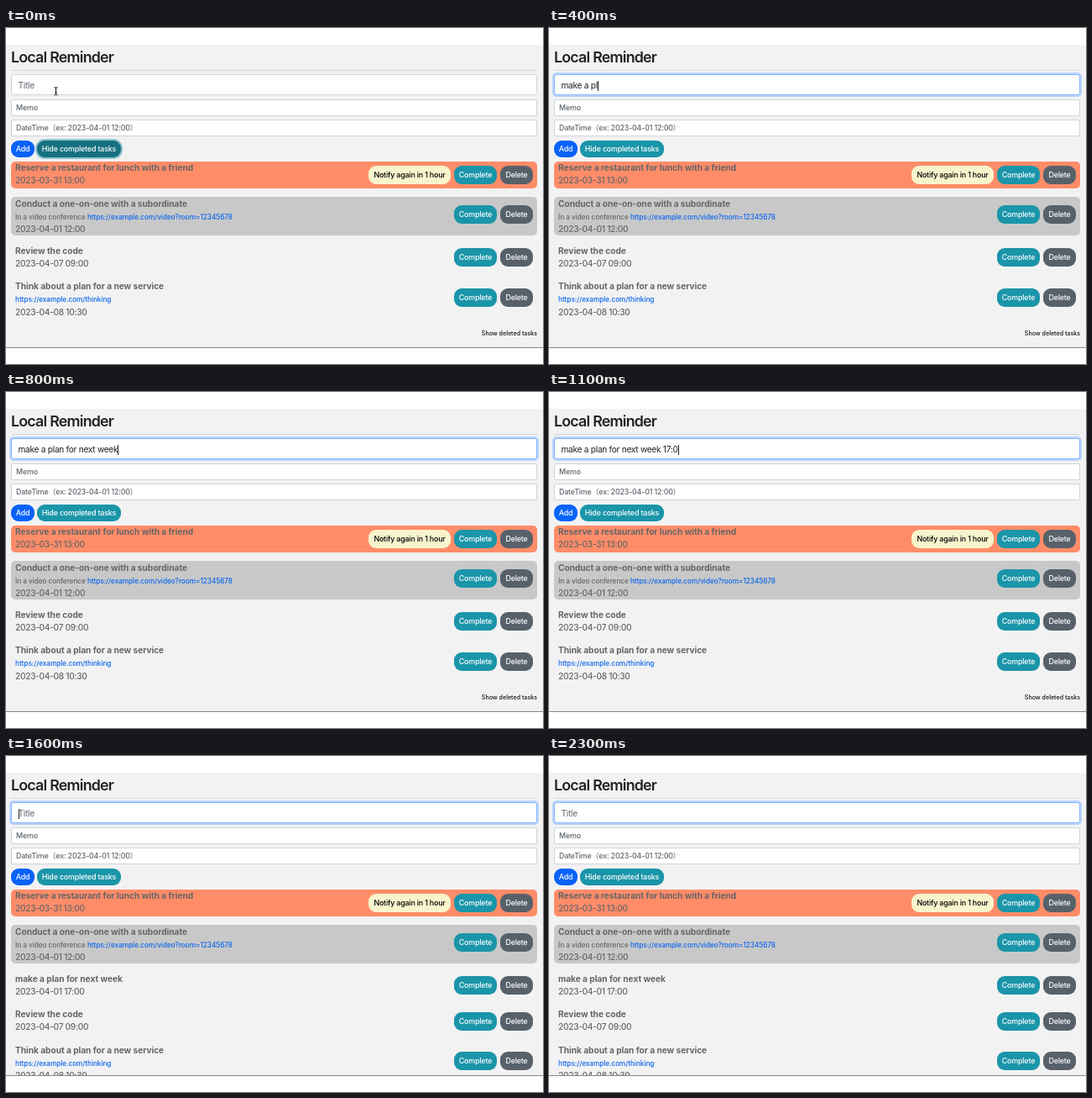
These frames come from a looping animation (640 by 400 pixels, 2.4 s). An HTML page:

```html
<!DOCTYPE html>
<html lang="en">
<head>
<meta charset="utf-8">
<title>Local Reminder</title>
<style>
  html, body { margin: 0; width: 100%; height: 100%; overflow: hidden; background: #fff; }
  #stage {
    position: absolute; left: 0; top: 0; width: 640px; height: 400px; overflow: hidden;
    font: 500 8.89px/20px Inter, "Noto Sans CJK JP", sans-serif; letter-spacing: -.02em; color: #222;
  }
  #stage * { box-sizing: border-box; white-space: pre; }
  #page {
    position: absolute; left: 0; top: 20px; width: 640px; height: 361px;
    background: #f2f2f2; border-bottom: 1px solid #868686; overflow: hidden;
  }
  #page > *, .row > * { position: absolute; }
  h1 { margin: 0; left: 6px; top: 3px; font-size: 17.8px; line-height: 24px; font-weight: 600; letter-spacing: -.043em; }
  .rule { left: 6px; top: 30px; width: 627px; height: 1px; background: #d8d8d8; }

  .field {
    left: 6px; width: 627px; height: 20px; padding-left: 5px; line-height: 18px;
    background: #fff; border: 1px solid #ced4da; border-radius: 2px;
  }
  #title {
    top: 35px; height: 25px; padding-left: 7.5px; line-height: 24px;
    font-size: 10.16px; font-weight: 400; letter-spacing: -.028em; border-radius: 3px;
  }
  #title.focus { border-color: #86b7fe; box-shadow: 0 0 0 2px #b9d3fb; }
  .empty { color: #5f666d; }
  #caret {
    display: inline-block; width: 1px; height: 12px; margin-right: -1px;
    vertical-align: -2.5px; background: #222;
  }

  .btn { height: 22px; line-height: 22px; border-radius: 9px; text-align: center; color: #fff; }
  .add { left: 6px; top: 114px; width: 28px; height: 20px; line-height: 20px; background: #0763fa; }
  #hide { left: 37px; top: 114px; width: 100px; height: 20px; line-height: 20px; background: #1a95a9; }
  #hide.focus { background: #157080; box-shadow: 0 0 0 2px #8fc6d0; }
  .notify { left: 426px; width: 98px; background: #f8f4cc; color: #000; }
  .complete { left: 528px; width: 51px; background: #1a95a9; }
  .delete { left: 583px; width: 39px; background: #58616a; }

  .row { left: 6px; width: 627px; border-radius: 5px; color: #666; }
  .row > .name, .row > .date { left: 5px; font-size: 10.16px; letter-spacing: -.03em; }
  .row > .name { top: -2.9px; font-weight: 700; letter-spacing: -.004em; }
  .row > .memo { left: 5px; top: 13.3px; font-size: 8.26px; letter-spacing: -.008em; }
  .row a { color: #0a66ee; }
  .late { background: #ff8c69; }
  .done { background: #c8c8c8; }
  .deleted { right: 7px; top: 334px; font-size: 7.1px; letter-spacing: 0; color: #111; }
  #pointer { position: absolute; left: 55px; top: 69px; }
</style>
</head>
<body>
<div id="stage">
  <div id="page">
    <h1>Local Reminder</h1>
    <div class="rule"></div>
    <div id="title" class="field"><span id="typed"></span><span id="caret"></span><span id="hint" class="empty">Title</span></div>
    <div class="field empty" style="top:64.5px">Memo</div>
    <div id="when" class="field" style="top:89px"></div>
    <div class="btn add">Add</div>
    <div id="hide" class="btn">Hide completed tasks</div>
    <div id="rows" style="left:0;top:0"></div>
    <div id="deleted" class="deleted">Show deleted tasks</div>
  </div>
  <svg id="pointer" width="10" height="13" viewBox="0 0 10 13" fill="none">
    <defs>
      <path id="beam" d="M2.5 1.5Q4.5 1.5 4.5 3Q4.5 1.5 6.5 1.5M4.5 2.5V10M2.5 11Q4.5 11 4.5 9.5Q4.5 11 6.5 11M3.3 8H5.7"/>
    </defs>
    <use href="#beam" stroke="#fff" stroke-width="2.4"/>
    <use href="#beam" stroke="#111"/>
  </svg>
</div>
<script>
  const LOOP = 2400, STEP = 100;
  const PHRASE = 'make a plan for next week 17:00';
  // characters typed at each step
  const TYPED = [0, 0, 1, 5, 9, 12, 16, 20, 25, 26, 28, 30, 31, 31, 31, 31];
  const ADDED = 16, CARET_OFF = 19;
  const $ = id => document.getElementById(id);

  const tasks = [
    { name: 'Reserve a restaurant for lunch with a friend', date: '2023-03-31 13:00', kind: 'late' },
    { name: 'Conduct a one-on-one with a subordinate', date: '2023-04-01 12:00', kind: 'done',
      memo: 'In a video conference <a>https://example.com/video?room=12345678</a>' },
    { name: 'Review the code', date: '2023-04-07 09:00' },
    { name: 'Think about a plan for a new service', date: '2023-04-08 10:30',
      memo: '<a>https://example.com/thinking</a>' }
  ];
  const fresh = { name: 'make a plan for next week', date: '2023-04-01 17:00' };

  function listHtml(list) {
    let top = 139;
    return list.map(({ name, date, kind = '', memo }) => {
      const height = memo ? 46 : 32;
      const mid = memo ? 9.7 : 4.6;
      const button = (type, label) => `<div class="btn ${type}" style="top:${mid}px">${label}</div>`;
      const html = `<div class="row ${kind}" style="position:absolute;top:${top}px;height:${height}px">
        <div class="name">${name}</div>
        ${memo ? `<div class="memo">${memo}</div>` : ''}
        <div class="date" style="top:${memo ? 27.4 : 12.1}px">${date}</div>
        ${kind === 'late' ? button('notify', 'Notify again in 1 hour') : ''}
        ${button('complete', 'Complete')}${button('delete', 'Delete')}</div>`;
      top += height + 10.4;
      return html;
    }).join('');
  }

  const before = listHtml(tasks);
  const after = listHtml([...tasks.slice(0, 2), fresh, ...tasks.slice(2)]);
  let shown = -1;

  function show(step) {
    const count = TYPED[step] || 0;
    const added = step >= ADDED;
    const dated = count === PHRASE.length;
    $('typed').textContent = PHRASE.slice(0, count);
    $('hint').hidden = count > 0;
    $('caret').style.visibility = step > 0 && step < CARET_OFF ? 'visible' : 'hidden';
    $('title').classList.toggle('focus', step > 0);
    $('hide').classList.toggle('focus', step === 0);
    $('pointer').style.display = step < 2 ? '' : 'none';
    $('when').textContent = dated ? '2023-04-01 17:00:00' : 'DateTime（ex: 2023-04-01 12:00）';
    $('when').classList.toggle('empty', !dated);
    $('rows').innerHTML = added ? after : before;
    $('deleted').hidden = added;
  }

  function tick() {
    const step = Math.floor(performance.now() % LOOP / STEP);
    if (step !== shown) show(shown = step);
    requestAnimationFrame(tick);
  }
  tick();
</script>
</body>
</html>
```
